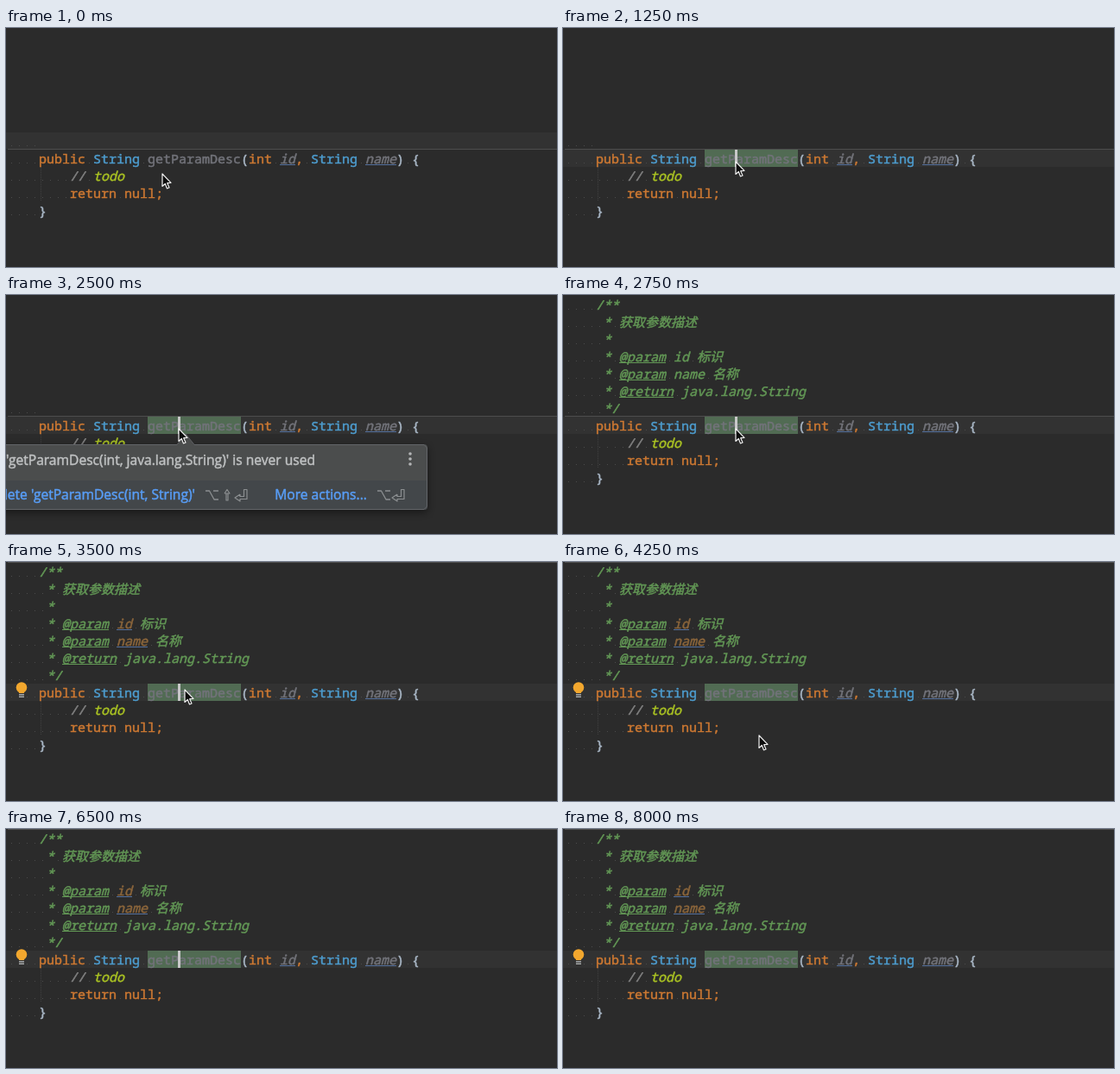
An HTML page with a canvas for the animation above (8.5 s loop, 638 by 277 pixels).

```html
<!DOCTYPE html>
<html lang="en">
<head>
<meta charset="utf-8">
<title>Generating a doc comment</title>
<style>
  html, body { margin: 0; width: 100%; height: 100%; overflow: hidden; background: #2b2b2b; }
  canvas { display: block; }
</style>
</head>
<body>
<canvas id="stage" width="638" height="277"></canvas>
<script>
const ctx = document.getElementById('stage').getContext('2d');
const LOOP = 8500, LEFT = 2, COL = 9, ROW = 20;
const MONO = '"Noto Sans Mono", "Noto Sans CJK SC", "Noto Sans CJK", monospace';
const UI = '15.6px "Open Sans", sans-serif';
const C = {
  bg: '#2b2b2b', line: '#323232', rule: '#4d4d4d', dot: '#4b4b4b',
  key: '#cc7832', type: '#4d9cce', unused: '#72737a', plain: '#a9b7c6',
  doc: '#629755', tag: '#8a653b', slash: '#808080', todo: '#a8c023',
  under: '#536f9c', mark: '#516b53', link: '#589df6', hint: '#8c8f91'
};

// Tokens: [text, colour, italic, underline colour]
const doc = (...parts) => parts.map(p => typeof p === 'string' ? [p, C.doc, true] : p);
const tag = s => [s, C.doc, true, C.doc];
const param = (s, linked) => linked ? [s, C.tag, true, C.under] : [s, C.doc, true];
const arg = s => [s, C.unused, true, C.under];

const docLines = linked => [
  doc('    /**'),
  doc('     * 获取参数描述'),
  doc('     *'),
  doc('     * ', tag('@param'), ' ', param('id', linked), ' 标识'),
  doc('     * ', tag('@param'), ' ', param('name', linked), ' 名称'),
  doc('     * ', tag('@return'), ' java.lang.String'),
  doc('     */')
];
const method = [
  [['    public ', C.key], ['String ', C.type], ['getParamDesc', C.unused], ['(', C.plain],
   ['int ', C.key], arg('id'), [', ', C.key], ['String ', C.type], arg('name'), [') {', C.plain]],
  [['        // ', C.slash, true], ['todo', C.todo, true]],
  [['        return null;', C.key]],
  [['    }', C.plain]]
];

// Pointer stops: [time, x, y]; a null x hides it
const pointer = [
  [0, 181, 169], [250, 183, 141], [500, 198, 151], [1250, 200, 155],
  [3500, 207, 148], [3750, 218, 149], [4000, 227, 172], [4250, 227, 201], [4500, null, 0]
];

function rect(x, y, w, h, color) {
  ctx.fillStyle = color;
  ctx.fillRect(x, y, w, h);
}

function stroke(color, width, ...lines) {
  ctx.strokeStyle = color;
  ctx.lineWidth = width;
  ctx.beginPath();
  for (const pts of lines) pts.forEach(([x, y], i) => i ? ctx.lineTo(x, y) : ctx.moveTo(x, y));
  ctx.stroke();
}

// Slightly emboldened text
function write(text, x, y, color) {
  ctx.fillStyle = ctx.strokeStyle = color;
  ctx.lineWidth = .5;
  ctx.lineJoin = 'round';
  ctx.fillText(text, x, y);
  ctx.strokeText(text, x, y);
}

function drawLine(tokens, row) {
  const top = 1 + row * ROW;
  let x = LEFT;
  for (const [text, color, italic, under] of tokens) {
    const start = x;
    ctx.font = `${italic ? 'italic ' : ''}500 15px ${MONO}`;
    for (const ch of text) {
      if (ch === ' ') rect(x + 4, top + 15, 1, 1, C.dot);
      else write(ch, x, top + 16, color);
      x += ch > '\u2fff' ? 15 : COL;
    }
    if (under) rect(start, top + 17, x - start, 1, under);
  }
}

function drawOption(x, y) {
  stroke(C.hint, 1.3, [[x, y - 5], [x + 4.5, y - 5], [x + 10, y + 5], [x + 15, y + 5]],
    [[x + 9, y - 5], [x + 15, y - 5]]);
}

function drawEnter(x, y) {
  stroke(C.hint, 1.2, [[x + 6, y - 1], [x, y + 3], [x + 6, y + 7], [x + 6, y + 4.5], [x + 14, y + 4.5],
    [x + 14, y - 6.5], [x + 10.5, y - 6.5], [x + 10.5, y + 1.5], [x + 6, y + 1.5], [x + 6, y - 1]]);
}

function drawShift(x, y) {
  stroke(C.hint, 1.2, [[x, y - 2], [x + 3, y - 6.5], [x + 6, y - 2], [x, y - 2]],
    [[x + 2, y - 2], [x + 2, y + 6], [x + 4, y + 6], [x + 4, y - 2]]);
}

function drawPopup() {
  ctx.save();
  ctx.shadowColor = 'rgba(0,0,0,.45)';
  ctx.shadowBlur = 8;
  ctx.shadowOffsetY = 3;
  ctx.fillStyle = '#4b4d4d';
  ctx.beginPath();
  ctx.roundRect(-20, 173, 508, 76, 4);
  ctx.fill();
  ctx.restore();

  ctx.fillStyle = '#4b4d4d';
  ctx.beginPath();
  ctx.moveTo(198, 174);
  ctx.lineTo(208, 161);
  ctx.lineTo(218, 174);
  ctx.fill();

  ctx.fillStyle = '#43474a';
  ctx.beginPath();
  ctx.roundRect(-20, 215, 508, 34, [0, 0, 4, 4]);
  ctx.fill();
  stroke('#636569', 1, [[-1, 173.5], [198, 173.5], [208, 161], [218, 173.5], [484, 173.5],
    [487.5, 177], [487.5, 245], [484, 248.5], [-1, 248.5]]);

  ctx.font = UI;
  ctx.textAlign = 'right';
  write("Method 'getParamDesc(int, java.lang.String)' is never used", 358, 197, '#bfc1c2');
  write("Delete 'getParamDesc(int, String)'", 219, 237, C.link);
  write('More actions...', 418, 237, C.link);
  ctx.textAlign = 'left';

  drawOption(231, 232);
  drawShift(253, 232);
  drawEnter(265, 232);
  drawOption(430, 232);
  drawEnter(447, 232);
  for (const y of [184, 190, 196]) {
    ctx.fillStyle = '#b4b6b7';
    ctx.beginPath();
    ctx.arc(468, y, 1.8, 0, 7);
    ctx.fill();
  }
}

function drawBulb() {
  ctx.fillStyle = '#f2a72e';
  ctx.beginPath();
  ctx.arc(18, 145.5, 6.3, 0, 7);
  ctx.fill();
  rect(15, 149, 6, 3, '#f2a72e');
  rect(15, 153, 6, 1.5, '#a5a7a8');
  rect(15, 155.5, 6, 1.5, '#a5a7a8');
}

function drawPointer(t) {
  const [, x, y] = pointer.findLast(p => t >= p[0]);
  if (x === null) return;
  ctx.save();
  ctx.translate(x, y);
  ctx.beginPath();
  for (const [px, py] of [[0, 0], [0, 14.5], [3.3, 11.5], [5.5, 17], [8, 16], [5.7, 10.7], [10, 10.3]])
    ctx.lineTo(px, py);
  ctx.closePath();
  ctx.fillStyle = '#0c0c0c';
  ctx.fill();
  ctx.strokeStyle = '#f0f0f0';
  ctx.lineWidth = 1.2;
  ctx.stroke();
  ctx.restore();
}

function draw(t) {
  const documented = t >= 2750;
  const caret = t >= 1000 && (t < 2000 || Math.floor(t / 500) % 2 === 1);

  rect(0, 0, 638, 277, C.bg);
  rect(0, t < 1000 ? 121 : 141, 638, t < 1000 ? 19 : 20, C.line);
  if (t < 3250) rect(2, 140, 636, 1, C.rule);
  if (t >= 3000) rect(2, 0, 636, 1, C.rule);
  if (t >= 1250) rect(164, 141, 108, 20, C.mark);
  ctx.setLineDash([1, 1]);
  stroke('#404040', 1, [[40.5, 161], [40.5, 201]]);
  ctx.setLineDash([]);

  if (documented) docLines(t >= 3000).forEach(drawLine);
  else drawLine([['    ', C.plain]], 6);
  method.forEach((tokens, i) => drawLine(tokens, i + 7));

  if (t >= 3500) drawBulb();
  if (t >= 1500 && !documented) drawPopup();
  if (caret) rect(199, 141, 3, 20, '#c8c8c8');
  drawPointer(t);
}

const start = performance.now();
function tick() {
  draw((performance.now() - start) % LOOP);
  requestAnimationFrame(tick);
}
tick();
</script>
</body>
</html>
```
